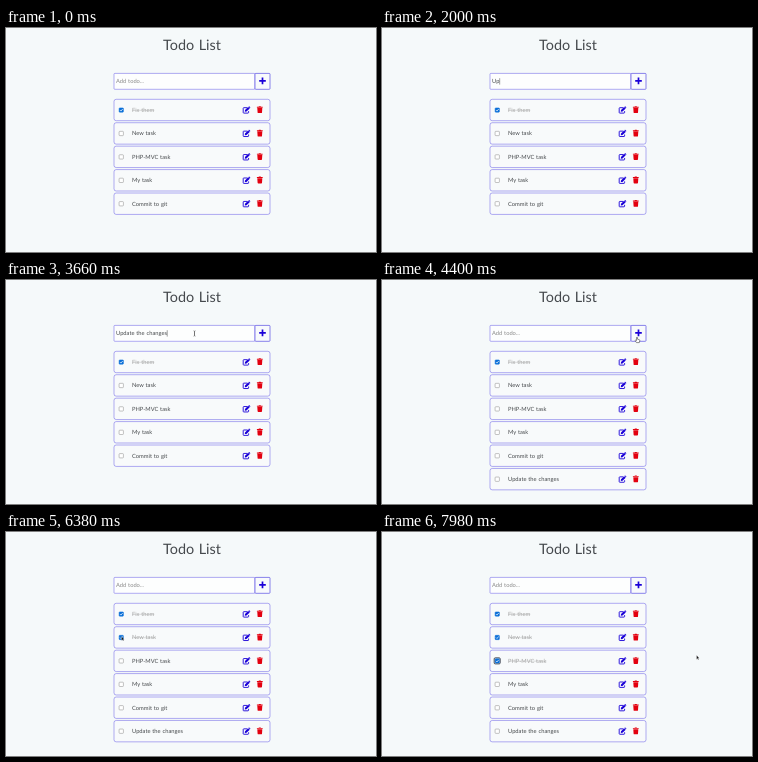
Animation, 370 px wide and 224 px high, one loop 8 s. Source, as an HTML page:

```html
<!DOCTYPE html>
<html lang="en">
<head>
<meta charset="utf-8">
<title>Todo List</title>
<style>
  html, body { margin: 0; width: 100%; height: 100%; overflow: hidden; background: #f5f9fa; }
  svg { display: block; width: 100vw; height: 100vh; }
  text { font-family: Lato, "Open Sans", sans-serif; font-size: 5.75px; fill: #484b4e; word-spacing: .06em; white-space: pre; text-rendering: geometricPrecision; }
  .title { font-size: 14.4px; fill: #45494d; text-anchor: middle; }
  .box { stroke: #3d2fe0; stroke-width: .4; }
  .hint { fill: #8a8a8a; }
  .done text { fill: #a6a6a6; }
  .strike { stroke: #a6a6a6; stroke-width: .4; }
</style>
</head>
<body>
<svg viewBox="0 0 370 224" xmlns="http://www.w3.org/2000/svg">
  <defs>
    <g id="edit">
      <path d="M4.6 1.2H1Q.4 1.2 .4 1.8V6Q.4 6.6 1 6.6H5.2Q5.8 6.6 5.8 6V4.6" fill="none" stroke="#1a00d8" stroke-width=".9"/>
      <path d="M2.2 3.6L5.4.5 6.9 2 3.7 5.1 2 5.3ZM5.7.2L6.1-.1Q6.4-.3 6.7 0L7.4.7Q7.7 1 7.4 1.3L7.1 1.7Z" fill="#1a00d8"/>
    </g>
    <path id="trash" fill="#e3000f" d="M0 .3H1.7L2-.2H3.8L4.1.3H5.8V1.2H0ZM.4 1.5H5.4L5.1 6Q5 6.6 4.4 6.6H1.4Q.8 6.6 .7 6Z"/>
  </defs>
  <rect width="370" height="224" fill="#f5f9fa"/>
  <text class="title" x="186" y="22">Todo List</text>
  <rect class="box" x="108" y="45.4" width="141" height="15.9" rx=".8" fill="#fdfefe"/>
  <rect class="box" x="249" y="45.4" width="15" height="15.9" rx=".8" fill="#f8fafc" style="stroke-width:.6"/>
  <path d="M253.2 52.9H259.8M256.5 49.6V56.2" stroke="#1a00d8" stroke-width="1.7"/>
  <text id="entry" x="110" y="55.2"></text>
  <path id="caret" stroke="#333" stroke-width=".45" d="M0 50.2V56.6"/>
  <g id="list"></g>
  <g id="pointer">
    <path id="arrow" d="M0 0V4.2L.9 3.4 1.5 4.7 2.1 4.4 1.5 3.1H2.7Z" fill="#111" stroke="#fff" stroke-width=".25"/>
    <path id="beam" d="M-1-2.7Q0-2.7 0-2V2Q0 2.7-1 2.7M1-2.7Q0-2.7 0-2V2Q0 2.7 1 2.7" fill="none" stroke="#444" stroke-width=".5"/>
    <path id="hand" d="M-.5.2Q0-.4.5.2V2L2.4 2.5Q2.9 2.7 2.8 3.3L2.3 5.4H-.5L-2 3.4Q-1.7 2.6-.5 3.3Z" fill="#fff" stroke="#222" stroke-width=".5"/>
  </g>
</svg>
<script>
const $ = id => document.getElementById(id);
const LOOP = 8000, ENTRY = 'Update the changes';
const CLICK = 1400, TYPE = 1720, KEY = 100, ADD = 4240, RING = 7020;
const names = ['Fix them', 'New task', 'PHP-MVC task', 'My task', 'Commit to git', ENTRY];
const checkedAt = [0, 6240, RING];

$('list').innerHTML = names.map((name, i) => `
  <g transform="translate(0 ${82 + i * 23.43})">
    <rect class="box" x="108" y="-10.7" width="156" height="21.4" rx="2.2" fill="#f8fafb"/>
    <rect class="ring" x="112.2" y="-3" width="6" height="6" rx="1" fill="none" stroke="#182030" stroke-width=".8"/>
    <rect class="check" x="113.1" y="-2.1" width="4.3" height="4.3" rx=".7" stroke-width=".5"/>
    <path class="tick" d="M114 .1L115 1.1 116.7-1" fill="none" stroke="#fff" stroke-width=".7"/>
    <text x="126" y="1.9">${name}</text>
    <path class="strike"/>
    <use href="#edit" x="236.8" y="-3.5"/>
    <use href="#trash" x="250.9" y="-3.5"/>
  </g>`).join('');
const rows = [...$('list').children];

// time, x, y of the pointer
const path = [
  [500, 198, 67], [1000, 185, 53.3], [3600, 185, 53.3], [4050, 255, 57.2],
  [4500, 255, 57.2], [5200, 134.8, 114.2], [5560, 134.8, 114.2], [6060, 115.6, 104.4],
  [6560, 115.6, 104.4], [6880, 115.6, 127.8], [7300, 115.6, 127.8], [7900, 314.6, 123.2]
];

const show = (el, on) => el.setAttribute('visibility', on ? 'visible' : 'hidden');

function pointerAt(t) {
  const n = path.findIndex(p => p[0] > t);
  if (n < 0) return path[path.length - 1].slice(1);
  if (n === 0) return path[0].slice(1);
  const [a, b] = [path[n - 1], path[n]];
  const u = (t - a[0]) / (b[0] - a[0]), k = u * u * (3 - 2 * u);
  return [a[1] + (b[1] - a[1]) * k, a[2] + (b[2] - a[2]) * k];
}

function drawRow(row, i, t) {
  const done = t >= (checkedAt[i] ?? Infinity);
  row.setAttribute('class', done ? 'done' : '');
  row.style.display = i < 5 || t >= ADD ? '' : 'none';
  const check = row.querySelector('.check');
  check.setAttribute('fill', done ? '#0b6fd8' : '#fff');
  check.setAttribute('stroke', done ? '#0b6fd8' : '#858585');
  const strike = row.querySelector('.strike');
  const width = row.querySelector('text').getComputedTextLength();
  strike.setAttribute('d', `M126 .3h${width}`);
  show(strike, done);
  show(row.querySelector('.tick'), done);
  show(row.querySelector('.ring'), t >= RING && checkedAt[i] === RING);
}

function drawEntry(t) {
  const entry = $('entry'), focus = t >= CLICK && t < ADD;
  const typed = focus ? ENTRY.slice(0, Math.max(0, Math.floor((t - TYPE) / KEY))) : '';
  entry.textContent = typed || 'Add todo...';
  entry.setAttribute('class', typed ? '' : 'hint');
  const width = typed ? entry.getComputedTextLength() : 0;
  $('caret').setAttribute('transform', `translate(${110.3 + width} 0)`);
  const typing = t >= TYPE && t < TYPE + KEY * (ENTRY.length + 3);
  show($('caret'), focus && t < 4050 && (typing || (t - CLICK) % 1000 < 500));
}

function drawPointer(t) {
  const [x, y] = pointerAt(t);
  const visible = t >= 500 && (t < TYPE || t >= 3600);
  const overForm = y > 45 && y < 61.3 && x > 108 && x < 264;
  const kind = !overForm ? 'arrow' : x < 249 ? 'beam' : 'hand';
  $('pointer').setAttribute('transform', `translate(${x} ${y})`);
  for (const id of ['arrow', 'beam', 'hand']) show($(id), visible && id === kind);
}

function render(t) {
  rows.forEach((row, i) => drawRow(row, i, t));
  drawEntry(t);
  drawPointer(t);
}

const start = performance.now();
function frame() {
  render((performance.now() - start) % LOOP);
  requestAnimationFrame(frame);
}
frame();
</script>
</body>
</html>
```
